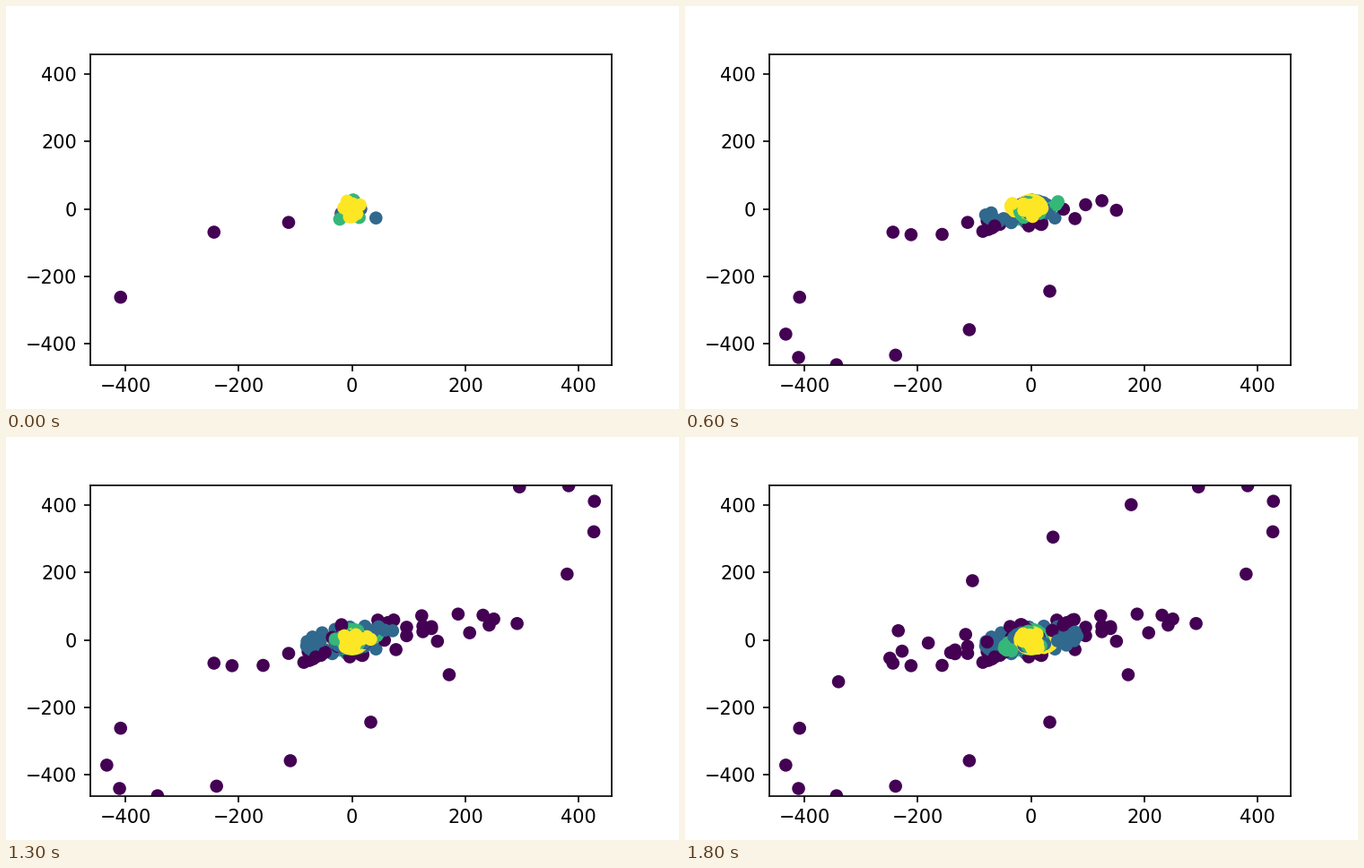
A matplotlib script for the animation above (1900 ms loop, 750x450 px).

```python
import numpy as np
import matplotlib.pyplot as plt
from matplotlib.animation import FuncAnimation

FRAMES = 19
STEP_MS = 100
GOLDEN = (np.sqrt(5) - 1) / 2

# Wide orbits of each colour: x reach, step of greatest x, y reach, step of greatest y
PURPLE = [(433, 10.52, 463, 12.43), (250.5, 8.8, 77, 10.9), (142, 7.5, 41, 8.8),
          (76, 13.8, 61, 13.7), (19, 3, 46, 13.5)]
BLUE = [(81, 15.9, 41, 12.1), (77.5, 14.2, 29, 12)]
GREEN = [(47.5, 6.2, 32, 8.5)]
YELLOW = [(36, 14.3, 24, 8.5)]


def disc(count, width, height):
    """Small orbits spread like sunflower seeds, turning together."""
    orbits = []
    for n in range(count):
        reach = np.sqrt((n + 0.5) / count)
        peak = FRAMES * GOLDEN * n
        orbits.append((width * reach, peak, height * reach, peak - FRAMES / 4))
    return orbits


def positions(orbits, step):
    x_reach, x_peak, y_reach, y_peak = np.array(orbits).T
    turn = 2 * np.pi / FRAMES
    return (x_reach * np.cos(turn * (step - x_peak)),
            y_reach * np.cos(turn * (step - y_peak)))


families = [
    PURPLE + disc(2, 30, 22),
    BLUE + disc(3, 35, 28),
    GREEN + disc(4, 22, 34),
    YELLOW + disc(8, 20, 27),
]
orbits = sum(families, [])
colors = np.repeat(range(len(families)), [len(family) for family in families])

fig, ax = plt.subplots(figsize=(5, 3), dpi=150)
ax.set_xlim(-462.4, 458.1)
ax.set_ylim(-462.6, 459.4)
ticks = range(-400, 401, 200)
ax.set_xticks(ticks)
ax.set_yticks(ticks)
ax.set_autoscale_on(False)

layers = [
    ax.scatter(*positions(orbits, step), c=colors, cmap="viridis", visible=step == 0)
    for step in range(FRAMES)
]


def update(frame):
    # Every earlier layer stays, so the dots leave a trail
    for step, layer in enumerate(layers):
        layer.set_visible(step <= frame)
    return layers


anim = FuncAnimation(fig, update, frames=FRAMES, interval=STEP_MS,
                     repeat=True, repeat_delay=0, blit=False)
plt.show()
```
